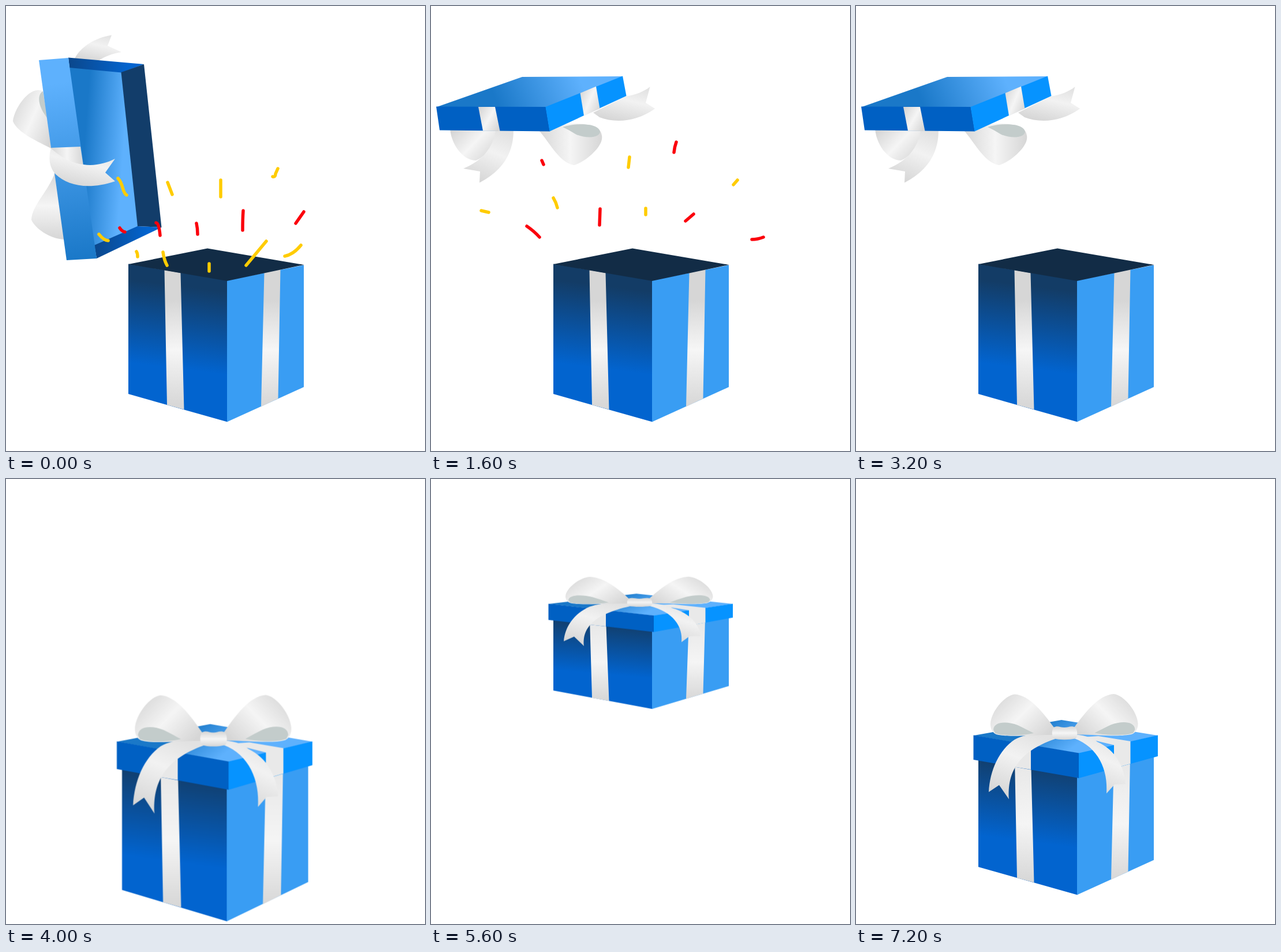
Animation of 726x772 px, one loop 8000 ms. Source, as an HTML page:

```html
<!DOCTYPE html>
<html lang="en">
<head>
<meta charset="utf-8">
<title>Gift box</title>
<style>
html, body { margin: 0; width: 100%; height: 100%; overflow: hidden; background: #fff; }
svg { display: block; width: 100vw; height: 100vh; }

/* Each part is on for a share of the loop; --at is its starting step. */
.part { visibility: hidden; animation: 8s step-end infinite; animation-delay: calc(var(--at, 0) * .8s - 8s); }
.once { animation-name: once; }
.drift { animation-name: drift; }
.half { animation-name: half; }
@keyframes once { 0% { visibility: visible } 10%, 100% { visibility: hidden } }
@keyframes drift { 0% { visibility: visible } 40%, 100% { visibility: hidden } }
@keyframes half { 0% { visibility: visible } 50%, 100% { visibility: hidden } }

.bounce { animation: bounce 8s step-end -8s infinite; transform-origin: 0 0; }
@keyframes bounce {
  0%, 50% { transform: matrix(1.061, 0, 0, 1.1275, -23.9, -46) }
  60% { transform: matrix(1, 0, 0, 1.0595, 0, -115.9) }
  70% { transform: matrix(1, 0, 0, .659, 0, -76.5) }
  80% { transform: matrix(1, 0, 0, .788, 0, -52) }
  90%, 100% { transform: none }
}

.confetti { fill: none; stroke-width: 5.5; stroke-linecap: round; stroke-linejoin: round; }
.gold { stroke: #fc0; }
.red { stroke: #fb000c; }
.front { fill: #0060c3; }
.side { fill: #0693ff; }
.lining { fill: #c3cccb; }
</style>
</head>
<body>
<svg viewBox="0 0 726 772" preserveAspectRatio="none">
  <defs>
    <linearGradient id="shade" gradientUnits="userSpaceOnUse" x1="298" y1="485" x2="280" y2="627">
      <stop stop-color="#133c66"/><stop offset="1" stop-color="#0264cf"/>
    </linearGradient>
    <linearGradient id="band" gradientUnits="userSpaceOnUse" x1="0" y1="510" x2="0" y2="690">
      <stop stop-color="#d6d6d6"/><stop offset=".48" stop-color="#f6f6f6"/><stop offset="1" stop-color="#d8d8d8"/>
    </linearGradient>
    <linearGradient id="bandShut" gradientUnits="userSpaceOnUse" x1="0" y1="480" x2="0" y2="695">
      <stop stop-color="#e6e6e6"/><stop offset=".55" stop-color="#f5f5f5"/><stop offset="1" stop-color="#d8d8d8"/>
    </linearGradient>
    <linearGradient id="silk">
      <stop stop-color="#d6d6d6"/><stop offset=".5" stop-color="#f5f5f5"/><stop offset="1" stop-color="#d6d6d6"/>
    </linearGradient>
    <linearGradient id="silkDiag" href="#silk" x1="0" y1=".15" x2="1" y2=".8"/>
    <linearGradient id="silkDown" href="#silk" x2="0" y2="1"/>
    <linearGradient id="tail" x1=".7" y1="0" x2=".3" y2="1">
      <stop stop-color="#e2e2e2"/><stop offset=".4" stop-color="#f2f2f2"/><stop offset="1" stop-color="#d5d5d5"/>
    </linearGradient>
    <linearGradient id="sky">
      <stop stop-color="#1a78c8"/><stop offset="1" stop-color="#5eb1fd"/>
    </linearGradient>
    <linearGradient id="topShut" href="#sky" gradientUnits="userSpaceOnUse" x1="330" y1="415" x2="370" y2="470"/>
    <linearGradient id="topFly" href="#sky" gradientUnits="userSpaceOnUse" x1="120" y1="180" x2="255" y2="120"/>
    <linearGradient id="inside" href="#sky" gradientUnits="userSpaceOnUse" x1="135" y1="250" x2="203" y2="255"/>
    <linearGradient id="rim" href="#sky" gradientUnits="userSpaceOnUse" x1="125" y1="440" x2="82" y2="135"/>
    <linearGradient id="deep">
      <stop stop-color="#0b478b"/><stop offset=".8" stop-color="#0364cf"/>
    </linearGradient>

    <g id="body">
      <path fill="url(#shade)" d="M212 447.500L383.500 476V721.500L212 673Z"/>
      <path fill="#399df3" d="M383 476L516 449.500V661L383 721.500Z"/>
    </g>
    <path id="bands" d="M274.500 458L302.500 463L308.500 700L279 692ZM447.500 463L475.500 457L471.500 681L442 695Z"/>
    <g id="loop">
      <path fill="url(#silkDiag)" d="M343 431C325 406 301 375 275 373.500C258 375 234 403 233 425C233 433 236 440 243 443C265 449 310 443 343 444Z"/>
      <path class="lining" d="M238 435C239 420 262 420 280 427C291 432 300 437 308 441C290 445 255 447 241 441Z"/>
    </g>
  </defs>

  <g class="part half">
    <use href="#body"/>
    <use href="#bands" fill="url(#band)"/>
    <path fill="#122c46" d="M212 448L349 420.500L516.500 449L383 477Z"/>
  </g>

  <!-- lid flung open -->
  <g class="part once">
    <path fill="url(#tail)" d="M119 91C130 70 155 55 183 50.500L176 69L200 80C185 82 170 88 160 95Z"/>
    <path fill="url(#silkDiag)" d="M80 248C55 235 20 220 12 200C14 180 35 147 55 146C60 146 64 147 66 150Z"/>
    <path class="lining" d="M64 148C54 153 54 173 72 195Z"/>
    <path fill="url(#silkDown)" d="M85 288C75 320 45 345 44 371C50 385 75 404 101 405Z"/>
    <path fill="url(#inside)" d="M109 104L200 114L229 383L153 416Z"/>
    <path fill="url(#deep)" d="M108 89.500L239 101L200 115.500L110 107Z"/>
    <path fill="#123d6a" d="M239 101L269.500 384L228 382L199.500 115Z"/>
    <path fill="url(#deep)" d="M153 415L228 382L269.500 384L157 438Z"/>
    <path fill="url(#rim)" d="M57 94L108 90L157 438L105 441Z"/>
    <path fill="url(#silk)" d="M77.500 246L129 244L134 277L84 280Z"/>
    <path fill="url(#tail)" d="M78 247C95 262 113 273 134 275C154 278 173 273 189 265L172 289L189 304C142 320 106 311 86 292C75 280 73 263 78 247Z"/>
  </g>

  <!-- lid floating -->
  <g class="part drift" style="--at:1">
    <path fill="url(#silkDiag)" d="M33 213C35 240 55 268 78 268C96 260 112 240 114 213Z"/>
    <path fill="url(#tail)" d="M143 215C143 255 125 285 84 306.500L85 287L56 282C90 268 108 245 112 215Z"/>
    <path fill="url(#silk)" d="M186 215C205 235 220 270 247 276C262 274 300 245 296 225C294 208 275 204 240 204Z"/>
    <path class="lining" d="M228 210C250 203 290 202 293 218C292 230 265 230 250 222C242 217 235 213 228 210Z"/>
    <path fill="url(#tail)" d="M281 185L337 157C355 154 370 148 379.500 140L372 168L388 178C355 202 318 203 292 193Z"/>
    <path fill="url(#topFly)" d="M9 175.500L158 123L332 122L199 176Z"/>
    <path class="front" d="M9 174.500L199 175L206 217.500L15 215.500Z"/>
    <path class="side" d="M198.500 175L332 121.500L338.500 156L205.500 217.500Z"/>
    <path fill="url(#silkDiag)" d="M82 175H111L119.500 217L90 216.500Z"/>
    <path fill="url(#silkDiag)" d="M258.500 151L286 139.500L292.500 178L265 190.500Z"/>
  </g>

  <g class="confetti part once">
    <path class="gold" d="M194 299Q199 304 202 315T209 328M280 306L288 327M372 302V331M462 296Q467 297 467 291L471 282M161 396Q170 407 177 407M226 426Q228 429 228 435M272 427Q274 441 279 450M352 447V460M416 450L451 408M483 434Q498 431 511 415"/>
    <path class="red" d="M197 385Q201 391 206 392M260 376Q265 376 267 398M330 377Q332 386 332 396M411 355Q410 370 410 389M502 377L516 357"/>
  </g>
  <g class="confetti part once" style="--at:1">
    <path class="gold" d="M248 372L254 392M349 345V366M152 384L160 389M372 215V238M265 235L270 250M485 355L500 335M545 200L552 188"/>
    <path class="red" d="M130 310L140 318M232 320L238 335M318 290V310M422 285L419 312M560 285L578 268"/>
  </g>
  <g class="confetti part once" style="--at:2">
    <path class="gold" d="M344 262L342 280M87 355L100 358M212 333Q217 341 219 350M372 351V362M524 310L531 302"/>
    <path class="red" d="M192 268L195 275M425 236Q422 244 421 254M293 352L292 380M166 382Q178 390 188 401M441 373L455 361M556 405Q566 405 576 401"/>
  </g>
  <g class="confetti part once" style="--at:3">
    <path class="gold" d="M340 150L339 160M47 300L55 301M190 240L194 250M372 250V258M555 225L559 220"/>
    <path class="red" d="M445 96L442 106M283 270L282 285M105 320L116 327M495 290L503 284"/>
  </g>

  <!-- closed gift -->
  <g class="part half" style="--at:5">
    <g class="bounce">
      <use href="#body"/>
      <use href="#bands" fill="url(#bandShut)"/>
      <path fill="url(#topShut)" d="M204 445L356 418L523 445L386 476Z"/>
      <path class="front" d="M203.500 444.500L386.500 475.500V519L203.500 487Z"/>
      <path class="side" d="M386 475.500L523 444.500V481L386 519Z"/>
      <path fill="#e8e8e8" d="M275 457L303 461V504L275 499.500Z"/>
      <path fill="#e9e9e9" d="M390 448L420 446L475.500 455V494L447 502V461.500Z"/>
      <path fill="url(#tail)" d="M345 443C310 440 290 444 275 452C248 470 232 505 230 543L248 531L265 555.500C262 510 280 473 345 451Z"/>
      <path fill="url(#tail)" d="M378 443C400 445 412 450 418 456C450 470 465 500 467 529L448 530L434 545.500C437 505 420 465 378 450Z"/>
      <use href="#loop"/>
      <use href="#loop" transform="matrix(-1 0 0 1 721.500 -.5)"/>
      <path fill="url(#silkDown)" d="M342 431C350 427 353 431 361 431C369 431 372 427 381 431C384 438 384 446 381 450C370 453 352 453 342 450C339 444 339 437 342 431Z"/>
    </g>
  </g>
</svg>
</body>
</html>
```
